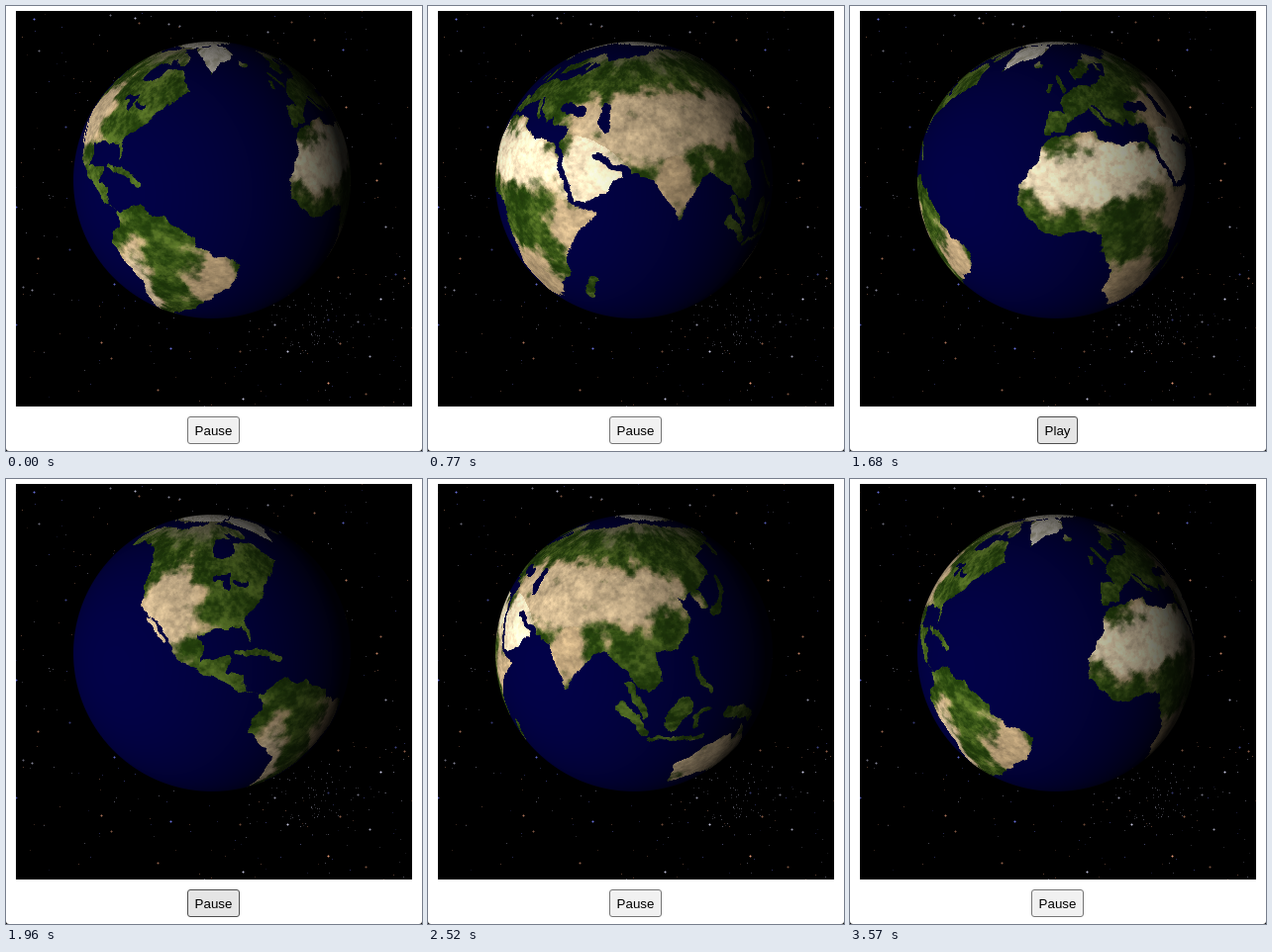
Recreate the animation shown at these times as an HTML page with a canvas. Size 420 px wide and 450 px high, loop 3.64 s.

```html
<!DOCTYPE html>
<html lang="en">
<head>
<meta charset="utf-8">
<title>Spinning globe</title>
<style>
  html, body { margin: 0; width: 100%; height: 100%; overflow: hidden; background: #000; }
  #page { position: absolute; left: 0; top: 0; width: 420px; height: 450px; background: #fff; border-radius: 0 0 3px 3px; }
  canvas { position: absolute; }
  #sky { left: 10px; top: 5px; background: #000; }
  #globe { left: 66px; top: 34px; }
  button {
    position: absolute; top: 415px; height: 28px; left: 183px; width: 53px; box-sizing: border-box; padding: 0; margin: 0;
    border: 1px solid #767676; border-radius: 3px; background: #f1f1f1; color: #000;
    font: 13.333px "Liberation Sans", Arial, sans-serif; text-align: center; pointer-events: none;
  }
  button.hover { background: #e5e5e5; border-color: #4f4f4f; }
  button.paused { left: 189px; width: 41px; }
</style>
</head>
<body>
<div id="page">
  <canvas id="sky" width="400" height="400"></canvas>
  <canvas id="globe" width="284" height="284"></canvas>
  <button id="toggle">Pause</button>
</div>
<script>
const $ = id => document.getElementById(id);
let seed = 11;
const rand = () => (seed = (seed * 16807) % 2147483647) / 2147483647;
const smooth = (a, b, x) => {
  const t = Math.min(1, Math.max(0, (x - a) / (b - a)));
  return t * t * (3 - 2 * t);
};
const mix = (a, b, t) => a.map((v, i) => v + (b[i] - v) * t);

// ---- Stars ----
const sky = $('sky').getContext('2d');
const tints = ['120,130,255', '255,170,130', '225,225,255'];
function dot(x, y, tint, alpha) {
  sky.fillStyle = `rgba(${tints[tint]},${alpha})`;
  sky.fillRect(x | 0, y | 0, 1, 1);
}
for (let i = 0; i < 300; i++) dot(rand() * 400, rand() * 400, i % 3, .1 + rand() * .3);
for (let i = 0; i < 110; i++)
  dot(305 + (rand() + rand() - 1) * 85, 320 + (rand() + rand() - 1) * 60, 2, .1 + rand() * .3);
for (let i = 0; i < 60; i++) {
  const x = rand() * 400, y = rand() * 400, glow = .4 + rand() * .5;
  for (const d of [-1, 1]) { dot(x + d, y, i % 3, glow / 2); dot(x, y + d, i % 3, glow / 2); }
  dot(x, y, i % 3, glow);
}

// ---- Land mask: coarse outlines in degrees, roughened later by noise ----
const PER_DEG = 4, MAP_W = 360 * PER_DEG, MAP_H = 180 * PER_DEG;
const sheet = document.createElement('canvas');
sheet.width = MAP_W;
sheet.height = MAP_H;
const mask = sheet.getContext('2d', { willReadFrequently: true });
mask.lineJoin = mask.lineCap = 'round';
mask.fillRect(0, 0, MAP_W, MAP_H);

function draw(color, width, pts) {
  mask.fillStyle = mask.strokeStyle = color;
  mask.lineWidth = width;
  for (const wrap of [0, 360]) {
    mask.setTransform(PER_DEG, 0, 0, -PER_DEG, (180 - wrap) * PER_DEG, 90 * PER_DEG);
    mask.beginPath();
    for (let i = 0; i < pts.length; i += 2) mask.lineTo(pts[i], pts[i + 1]);
    if (width) mask.stroke(); else mask.fill();
  }
}
const continent = (...pts) => draw('#fff', 0, pts);
const ridge = (width, ...pts) => draw('#fff', width, pts);
const water = (width, ...pts) => draw('#000', width, pts);

// Americas
continent(-167,66, -157,71, -128,70, -95,72, -82,68, -78,62, -66,61, -56,52, -66,45, -70,42, -76,35, -81,31,
  -80,25, -83,29.5, -90,29.5, -97,27, -96,19, -90,21, -87,21, -89,16, -83,15, -82,9, -77,8, -85,10, -95,16,
  -105,20, -112,30, -121,35, -124,41, -124,48, -134,58, -148,61, -160,56, -165,60);
continent(-77,8, -72,12, -62,10, -51,4, -50,0, -35,-6, -39,-17, -48,-27, -58,-36, -65,-43, -69,-53, -74,-50,
  -71,-18, -81,-5, -78,2);
continent(-44,60, -54,69, -70,78, -32,83, -18,78, -22,71, -40,65);
ridge(1.6, -116,31, -110,24);
ridge(2, -84,22, -77,21, -70,19);
ridge(6, -115,71, -85,72, -68,67);
ridge(6, -95,77, -72,81);
water(9, -88,59, -82,60);
water(2, -91,47, -86,47, -86,43);
water(1.5, -83,45, -77,43.5);
// Africa
continent(-6,35.5, 10,37, 11,33.5, 20,31, 32,31, 33,28, 37,21, 43,11.5, 51,12, 40,-4, 40,-15, 35,-21, 33,-28, 26,-34,
  18,-34, 12,-18, 14,-11, 9,0, 9,4.5, 4,6, -8,4.5, -17,13, -16,21, -10,31);
ridge(3.5, 49,-14, 46,-23);
// Eurasia
continent(-9,37, -9,43, -1,44, -4,48, 8,54, 20,55, 30,60, 40,67, 70,72, 104,77, 140,72, 190,66, 170,60, 155,59,
  137,54, 140,48, 129,41, 122,39, 118,39, 122,31, 115,22.5, 108,21, 109,12, 105,9, 100,13, 97,17, 91,22, 86,20,
  80,14, 77.5,8, 73,17, 70,22, 58,25.5, 59,22.5, 52,16.5, 43,13, 35,28, 34,31, 36,36.5, 27,37, 26,40, 23,37,
  20,40, 13,45.5, 8,44, 0,40, -2,37);
ridge(6, 8,60, 16,64, 27,69, 36,66);
ridge(2, 26,61.5, 27,65);
ridge(2.2, 11,44, 17,39);
ridge(3.2, -4,57, -1,52);
ridge(2.6, -8,53, -8,54);
ridge(2.6, -21,65, -16,65);
ridge(4, 157,53, 162,59);
ridge(3.4, 127,39, 128,36);
ridge(2.2, 99,12, 103,2);
water(4, 30,43.5, 39,43);
water(3.6, 51.5,38.5, 50,45);
water(2.3, 49,29.5, 54,26.5, 60,24.5);
water(1.8, 34.5,28, 42.5,13);
water(3, 18,56, 20,60, 22,64);
// Pacific arcs and Australia
ridge(2.4, 131,33, 136,35, 141,38, 142,44);
ridge(3, 96,5, 104,-4);
ridge(1.6, 105,-7, 124,-9);
ridge(6, 112,-1, 116,4);
ridge(1.8, 120,-4, 120.5,1, 125,1.3);
ridge(2.2, 121,18, 121.5,14, 125,8);
ridge(4.5, 133,-2, 141,-5, 148,-9);
ridge(2.5, 169,-45, 177,-38);
continent(114,-22, 126,-14, 136,-12, 140,-17, 142,-11, 153,-26, 150,-37, 140,-37, 131,-32, 115,-34);
const shore = mask.getImageData(0, 0, MAP_W, MAP_H).data;

// ---- Fractal noise ----
const lattice = Float32Array.from({ length: 65536 }, rand);
function noise(x, y) {
  const xi = Math.floor(x), yi = Math.floor(y), u = smooth(0, 1, x - xi), v = smooth(0, 1, y - yi);
  const at = (i, j) => lattice[(xi + i & 255) + ((yi + j & 255) << 8)];
  const top = at(0, 0) + (at(1, 0) - at(0, 0)) * u, low = at(0, 1) + (at(1, 1) - at(0, 1)) * u;
  return top + (low - top) * v - .5;
}
function fractal(x, y, octaves) {
  let sum = 0;
  for (let k = 0, f = 1; k < octaves; k++, f *= 2) sum += noise(x * f + k * 31, y * f + k * 57) / f;
  return sum;
}

// ---- Terrain: forest everywhere, deserts around a few dry centres, ice to the north ----
const OCEAN = [2, 2, 69], FOREST = [40, 72, 14], MEADOW = [82, 108, 36], TAN = [198, 170, 128],
  SAND = [255, 234, 196], TUNDRA = [128, 126, 92], SNOW = [226, 220, 210];
const dryCentres = [ // lon, lat, half width, half height, heat
  [8, 23, 30, 11, 1], [47, 24, 14, 12, 1], [68, 38, 28, 12, .3], [98, 40, 24, 9, .3], [77, 20, 8, 11, 0],
  [43, 6, 9, 9, .1], [24, -24, 15, 14, 0], [-110, 35, 11, 16, .3], [-72, -24, 6, 20, .5],
  [-44, -14, 9, 12, 0], [133, -25, 22, 14, .3]
];
function landColor(lon, lat) {
  const n = fractal(lon / 7, lat / 6, 5), grain = fractal(lon / 1.6 + 90, lat / 1.3, 3);
  if (Math.hypot((lon + 42) / 20, (lat - 73) / 12) + n * .2 < 1 || lat > 78) return mix(SNOW, TUNDRA, Math.abs(n));
  let dry = -1, heat = 0;
  for (const [x, y, w, h, hot] of dryCentres) {
    const d = 1.3 - Math.hypot((lon - x) / w, (lat - y) / h);
    if (d > dry) { dry = d; heat = hot; }
  }
  const green = mix(FOREST, MEADOW, smooth(-.5, .6, n + grain * .5));
  const desert = mix(TAN, SAND, heat * smooth(.15, .55, dry + n * .3));
  const ground = mix(green, desert, smooth(-.05, .5, dry + n * .9));
  const cold = mix(ground, TUNDRA, smooth(60, 76, lat + n * 14));
  return cold.map(c => c * (1 + (n + grain) * .2));
}
const texels = new Uint8ClampedArray(MAP_W * MAP_H * 3);
for (let row = 0; row < MAP_H; row++) for (let col = 0; col < MAP_W; col++) {
  const lon = col / PER_DEG - 180, lat = 90 - row / PER_DEG;
  let color = OCEAN;
  if (lat > -55) {
    const wx = Math.round(fractal(lon / 4, lat / 4, 3) * 2 * PER_DEG);
    const wy = Math.round(fractal(lon / 4 + 50, lat / 4 + 80, 3) * 2 * PER_DEG);
    const sx = (col + wx + MAP_W) % MAP_W, sy = Math.min(MAP_H - 1, Math.max(0, row + wy));
    const ice = lat + wy / 3 > 80 - 4 * Math.cos((lon + 160) * Math.PI / 180);
    const cover = ice ? 1 : shore[(sy * MAP_W + sx) * 4] / 255;
    if (cover > 0) color = mix(OCEAN, landColor(lon, lat), cover);
  }
  texels.set(color, (row * MAP_W + col) * 3);
}

// ---- Globe: one view ray per pixel, solved once ----
const SIZE = 284, RADIUS = 140, DIST = 3.4, TILT = 22 * Math.PI / 180;
const LIGHT = [-.53, -.07, .8], AMBIENT = .08;
const globe = $('globe').getContext('2d');
const image = globe.createImageData(SIZE, SIZE);
const rays = [];
for (let py = 0; py < SIZE; py++) for (let px = 0; px < SIZE; px++) {
  let X = (px + .5 - SIZE / 2) / RADIUS, Y = (SIZE / 2 - py - .5) / RADIUS;
  const r = Math.hypot(X, Y), cover = Math.min(1, (1 - r) * RADIUS + .5);
  if (cover <= 0) continue;
  const k = Math.min(1, .999 / r) / Math.sqrt(DIST * DIST - 1);
  X *= k;
  Y *= k;
  const q = 1 + X * X + Y * Y;
  const s = (DIST - Math.sqrt(Math.max(0, DIST * DIST - q * (DIST * DIST - 1)))) / q;
  const x = X * s, y = Y * s, z = DIST - s;
  const lat = Math.asin(y * Math.cos(TILT) + z * Math.sin(TILT));
  const lon = Math.atan2(x, z * Math.cos(TILT) - y * Math.sin(TILT));
  const at = (py * SIZE + px) * 4;
  image.data[at + 3] = cover * 255;
  rays.push({
    at,
    row: Math.min(MAP_H - 1, Math.floor((.5 - lat / Math.PI) * MAP_H)) * MAP_W,
    col: (lon / (2 * Math.PI) + .5) * MAP_W,
    shade: AMBIENT + Math.max(0, x * LIGHT[0] + y * LIGHT[1] + z * LIGHT[2])
  });
}
function drawGlobe(lon) {
  const shift = (lon / 360 + 5) * MAP_W, out = image.data;
  for (const { at, row, col, shade } of rays) {
    const from = (row + Math.floor(col + shift) % MAP_W) * 3;
    for (let c = 0; c < 3; c++) out[at + c] = texels[from + c] * shade;
  }
  globe.putImageData(image, 0, 0);
}

// ---- Timeline: facing longitude over time, flat while paused ----
const LOOP = 3640, STEP = 70;
const pauses = [{ from: 980, to: 1680, leave: 2100 }, { from: 2660, to: 3290, leave: 3430 }];
const spin = [[0, -44.6], [420, -184], [980, -365], [1680, -365], [1960, -453],
  [2520, -620], [2660, -660], [3290, -660], [LOOP, -770]];
function facing(t) {
  const i = spin.findIndex(([end]) => end > t);
  const [t0, a] = spin[i - 1], [t1, b] = spin[i];
  return a + (b - a) * (t - t0) / (t1 - t0);
}
const button = $('toggle');
let shown = -1;
function frame() {
  const t = Math.floor(performance.now() % LOOP / STEP) * STEP;
  if (t !== shown) {
    shown = t;
    drawGlobe(facing(t));
    const paused = pauses.some(p => t >= p.from && t <= p.to);
    button.textContent = paused ? 'Play' : 'Pause';
    button.classList.toggle('paused', paused);
    button.classList.toggle('hover', pauses.some(p => t >= p.from - STEP && t < p.leave));
  }
  requestAnimationFrame(frame);
}
frame();
</script>
</body>
</html>
```
